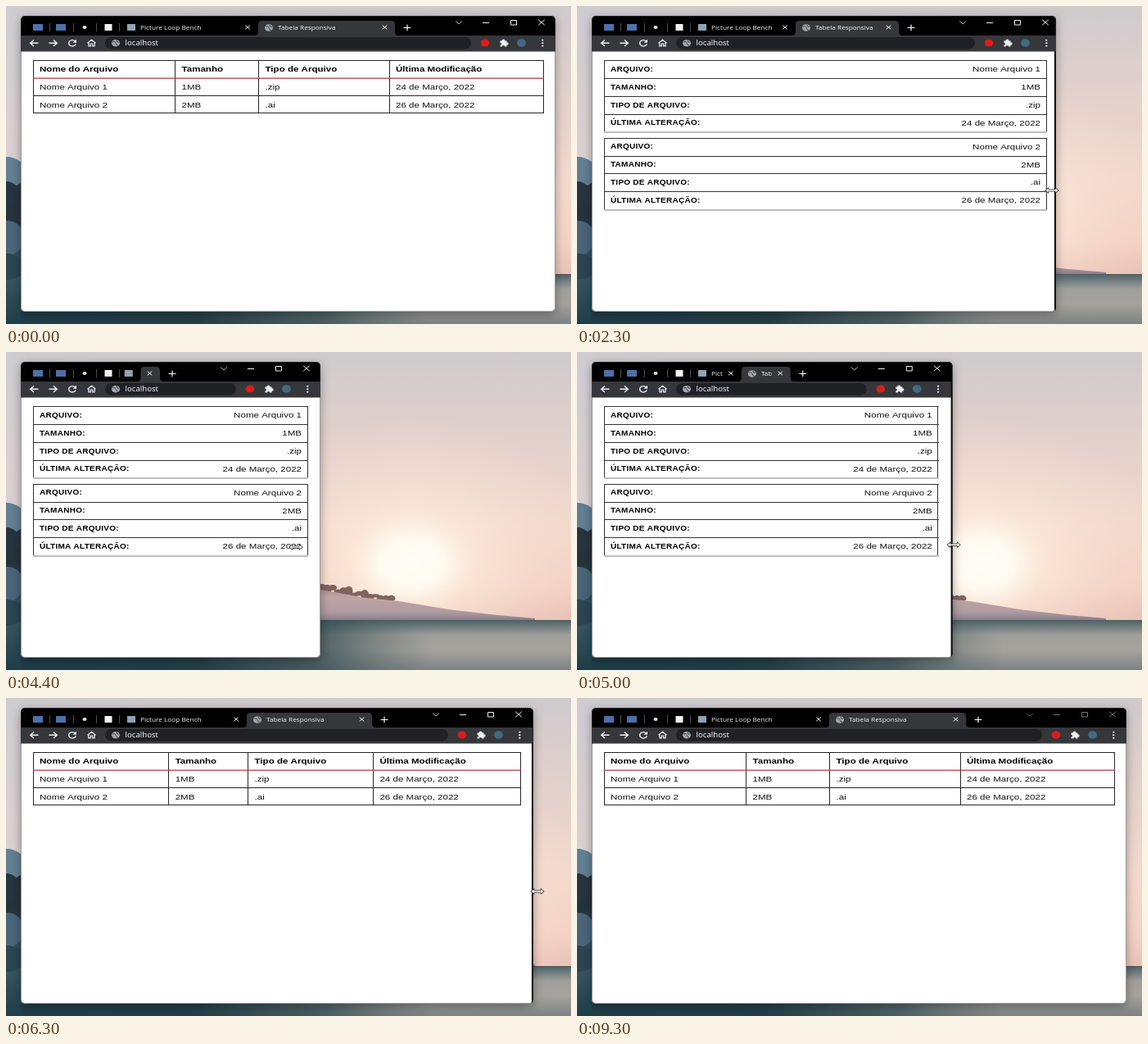
Animation of 690x388 px, one loop 9400 ms. Source, as an HTML page with a canvas:

```html
<!DOCTYPE html>
<html lang="pt">
<head>
<meta charset="utf-8">
<title>Tabela Responsiva</title>
<style>
html, body { margin: 0; width: 100%; height: 100%; overflow: hidden; background: #000; }
canvas { display: block; width: 690px; height: 388px; }
</style>
</head>
<body>
<canvas id="stage" width="690" height="388"></canvas>
<script>
const c = document.getElementById('stage').getContext('2d');
const LOOP = 9400, STEP = 100, LEFT = 18, TOP = 12, BOTTOM = 373;
const ASPECT = 1.18;
const BREAKPOINT = 612;   // below this the table turns into cards
const PAGE = '"Liberation Sans", Arial, sans-serif';
const UI = '"Open Sans", "Noto Sans", sans-serif';

// time, cursor x, cursor y, window edge, layout edge (lags behind)
const drag = [
  [1100, 674, 222, 671, 671],
  [1700, 640, 224, 643, 646],
  [2300, 580, 225, 585, 589],
  [3000, 470, 230, 475, 479],
  [3600, 380, 235, 384, 384],
  [4000, 352, 238, 384, 384],
  [4400, 354, 238, 384, 384],
  [4700, 384, 236, 384, 384],
  [5500, 587, 234, 583, 578],
  [6300, 649, 236, 644, 643],
  [7000, 672, 238, 670, 670],
  [7600, 677, 239, 675, 675],
  [8100, 673, 239, 671, 671]
];
const files = [
  ['Nome Arquivo 1', '1MB', '.zip', '24 de Março, 2022'],
  ['Nome Arquivo 2', '2MB', '.ai', '26 de Março, 2022']
];
const heads = ['Nome do Arquivo', 'Tamanho', 'Tipo de Arquivo', 'Última Modificação'];
const labels = ['ARQUIVO:', 'TAMANHO:', 'TIPO DE ARQUIVO:', 'ÚLTIMA ALTERAÇÃO:'];

function pose(t) {
  if (t <= drag[0][0]) return drag[0].slice(1);
  const i = drag.findIndex(k => k[0] > t);
  if (i < 0) return drag[drag.length - 1].slice(1);
  const a = drag[i - 1], b = drag[i], u = (t - a[0]) / (b[0] - a[0]);
  return a.slice(1).map((v, n) => v + (b[n + 1] - v) * u);
}

function rect(x, y, w, h, color) {
  c.fillStyle = color;
  c.fillRect(x, y, w, h);
}
function round(x, y, w, h, r, color) {
  c.beginPath();
  c.roundRect(x, y, w, h, r);
  c.fillStyle = color;
  c.fill();
}
function oval(x, y, rx, ry, color) {
  c.beginPath();
  c.ellipse(x, y, rx, ry, 0, 0, 7);
  c.fillStyle = color;
  c.fill();
}
function shape(d, x, y, color, width) {
  c.save();
  c.translate(x, y);
  const p = new Path2D(d);
  if (width) {
    c.strokeStyle = color;
    c.lineWidth = width;
    c.stroke(p);
  } else {
    c.fillStyle = color;
    c.fill(p);
  }
  c.restore();
}
function text(s, x, y, font, color, align = 'left', spacing = 0) {
  c.save();
  c.translate(x, y);
  c.scale(ASPECT, 1);
  c.font = font;
  c.letterSpacing = spacing + 'px';
  c.textAlign = align;
  c.fillStyle = color;
  c.fillText(s, 0, 0);
  c.restore();
}
function fade(g, stops) {
  stops.forEach(([p, color]) => g.addColorStop(p, color));
  return g;
}
function shade(x0, y0, x1, y1, stops) {
  return fade(c.createLinearGradient(x0, y0, x1, y1), stops);
}
function clipTo(x, y, w, h, r, draw) {
  c.save();
  c.beginPath();
  c.roundRect(x, y, Math.max(0, w), h, r);
  c.clip();
  draw();
  c.restore();
}

function wallpaper() {
  rect(0, 0, 690, 328, shade(0, 0, 0, 328,
    [[0, '#cfcacd'], [.3, '#e1d0cc'], [.65, '#f2d8cc'], [.88, '#f2cfc2'], [1, '#e8bfb4']]));
  rect(0, 0, 200, 328, shade(0, 0, 200, 0, [[0, 'rgba(205,205,213,.6)'], [1, 'rgba(205,205,213,0)']]));

  c.save();
  c.translate(495, 258);
  c.scale(1.25, 1);
  rect(-200, -190, 400, 260, fade(c.createRadialGradient(0, 0, 0, 0, 0, 180), [
    [0, '#fffdf6'], [.17, 'rgba(255,251,241,.97)'], [.34, 'rgba(255,240,224,.6)'],
    [.65, 'rgba(252,232,218,.3)'], [1, 'rgba(250,225,210,0)']]));
  c.restore();

  for (let i = 0; i < 14; i++) {
    oval(386 + i * 6.5, 287 + i * 1.2 + 2 * Math.sin(i * 2.3), 5, 4 + 2 * Math.sin(i * 1.7), '#80625f');
  }
  shape('M300 328V262L384 290L412 295L440 300L480 304L540 314L600 321L646 325V328Z', 0, 0,
    shade(0, 285, 0, 328, [[0, '#a58a88'], [.35, '#bda5a5'], [.75, '#b09ba0'], [1, '#857c86']]));

  rect(0, 327, 690, 61, shade(0, 327, 0, 388,
    [[0, '#4c6064'], [.1, '#66777a'], [.3, '#a09f9b'], [.6, '#a5a29c'], [1, '#7b8383']]));
  rect(0, 327, 520, 61, shade(0, 0, 520, 0,
    [[0, '#1f3d48'], [.45, 'rgba(30,58,68,.95)'], [.75, 'rgba(50,76,82,.7)'], [1, 'rgba(80,98,100,0)']]));

  rect(0, 215, 18, 173, shade(0, 215, 0, 388,
    [[0, '#26333d'], [.25, '#26333d'], [.55, '#385263'], [.7, '#355460'], [1, '#1f3e49']]));
  oval(0, 203, 24, 19, '#637f93');
  oval(0, 230, 17, 16, '#27343f');
  oval(2, 283, 20, 21, '#4a6579');
  oval(0, 318, 24, 16, '#2b4553');
}

function globe(x, y) {
  oval(x, y, 5, 4.3, '#a4a8ac');
  shape('M-4 -1Q-1 -3 0 0T3 3M1 -4Q1 -1 4 -1', x, y, '#55585c', 1.1);
}
function cross(x, y, r, color, width = 1) {
  shape(`M${-r} ${-r * .85}L${r} ${r * .85}M${r} ${-r * .85}L${-r} ${r * .85}`, x, y, color, width);
}

function tabs(edge, active) {
  const end = edge - 196, w = (end - 141) / 2, start = 141 + w, wide = w > 45;
  const light = '#f4f4f5', font = '500 7px ' + UI;
  rect(33, 22, 12, 8, '#4c70ad');
  rect(61, 22, 12, 8, '#4c70ad');
  oval(96, 26, 2.5, 2.1, '#e4e4e4');
  rect(120.5, 22, 9, 8, '#f2f2f2');
  [53, 82, 110, 138].forEach(x => rect(x, 21, 1, 10, '#4b4d51'));
  rect(Math.min(153, 138 + w / 2) - 5, 22, 10, 8, '#8fa3b5');

  shape(`M${start - 5} 36Q${start} 36 ${start} 32V22Q${start} 18 ${start + 5} 18H${end - 5}` +
    `Q${end} 18 ${end} 22V32Q${end} 36 ${end + 5} 36Z`, 0, 0, '#36373b');
  if (wide) {
    clipTo(160, 18, start - 23 - 160, 18, 0, () => text('Picture Loop Bench', 164, 28.5, font, light));
    cross(start - 13, 26, 2.8, light);
    globe(start + 13, 26.5);
    clipTo(start + 20, 18, w - 43, 18, 0, () => text('Tabela Responsiva', start + 24, 28.5, font, light));
  }
  cross(end - 12.5, 26, 2.8, light);
  shape('M-4.5 0H4.5M0 -3.8V3.8', edge - 181, 26.5, '#fff', 1.2);

  const ink = active ? '#f2f2f2' : '#77787a';
  shape('M-4 -1.5L0 2L4 -1.5', edge - 118, 20, active ? '#b5b5b5' : '#5c5d5f', 1);
  shape('M-4 0.5H4', edge - 85, 20, ink, 1);
  shape('M-3.5 -2.5H3.5V3H-3.5Z', edge - 51, 20, ink, 1);
  cross(edge - 17, 20, 3.8, ink);
}

function toolbar(edge) {
  const ink = '#f0f1f2';
  rect(LEFT, 36, edge - LEFT, 19.5, '#36373b');
  shape('M5 0H-4.5M-.5 -3.8L-4.8 0L-.5 3.8', 34.5, 45.2, ink, 1.4);
  shape('M-5 0H4.5M.5 -3.8L4.8 0L.5 3.8', 57.5, 45.2, ink, 1.4);
  shape('M3.5 -2.2A4.4 3.7 0 1 0 4.3 1', 81, 45.2, ink, 1.4);
  shape('M5 -4.5V-.5H.5Z', 81, 45.2, ink);
  shape('M-5 0L0 -4L5 0M-3.6 -.8V3.7H-1.2V.8H1.2V3.7H3.6V-.8', 104.5, 45.2, ink, 1.2);

  round(121, 38, edge - 224, 14.5, 7.2, '#202124');
  globe(134, 45.2);
  text('localhost', 145.5, 48, '500 8.2px ' + UI, '#fff');

  oval(edge - 86, 45, 5.3, 4.6, '#dc1c1c');
  const x = edge - 63;
  rect(x - 4.5, 42.5, 8, 7, ink);
  oval(x - .5, 42.2, 1.9, 1.8, ink);
  oval(x + 3.8, 46, 1.9, 1.8, ink);
  oval(x - 4.4, 46.2, 1.4, 1.3, '#36373b');
  oval(x - .5, 49.3, 1.4, 1.2, '#36373b');
  oval(edge - 41.5, 45, 5.4, 4.8, '#416a84');
  [41.8, 45.3, 48.8].forEach(y => oval(edge - 15.7, y, 1.2, 1, ink));
}

function table(edge) {
  const right = edge - 15, d = edge - 671, line = '#262626';
  const cols = [33, 206.5 + .28 * d, 308.5 + .464 * d, 468 + .7 * d];
  [...cols, right].forEach(x => rect(Math.floor(x), 66, 1, 65, line));
  [66, 109, 130].forEach(y => rect(33, y, right - 32, 1, line));
  rect(33, 87.5, right - 32, 1.3, '#b5434a');
  cols.forEach((x, i) => {
    text(heads[i], x + 8, 80.2, 'bold 9.8px ' + PAGE, '#000');
    files.forEach((f, n) => text(f[i], x + 8, 102.2 + n * 21.4, '9.8px ' + PAGE, '#111'));
  });
}

function cards(edge) {
  const right = edge - 15, line = '#333';
  files.forEach((file, n) => {
    const top = 66.4 + n * 94.4;
    [33, right - 1].forEach(x => rect(Math.floor(x), Math.round(top), 1, 87, line));
    file.forEach((value, i) => {
      const y = top + i * 21.75;
      rect(33, Math.round(y), right - 33, 1, line);
      text(labels[i], 41, y + 13.6, 'bold 8.5px ' + PAGE, '#000', 'left', .2);
      text(value, right - 8, y + 14, '9.8px ' + PAGE, '#111', 'right');
    });
    rect(33, Math.round(top + 86.7), right - 33, 2, '#bdbdbd');
  });
}

function cursor(x, y, busy) {
  if (busy) {
    oval(x, y, 5.5, 4.5, '#d8ecfb');
    c.strokeStyle = '#2f92dc';
    c.lineWidth = 2.8;
    c.stroke();
    return;
  }
  const d = 'M-7.5 0L-4.5 -2.5V-.7H4.5V-2.5L7.5 0L4.5 2.5V.7H-4.5V2.5Z';
  shape(d, x, y, '#222', 1.4);
  shape(d, x, y, '#fff');
}

function draw(t) {
  const [cx, cy, win, edge] = pose(t);
  const width = win - LEFT, height = BOTTOM - TOP;
  wallpaper();
  c.save();
  c.shadowColor = 'rgba(0,0,0,.35)';
  c.shadowBlur = 12;
  c.shadowOffsetY = 3;
  round(LEFT, TOP, width, height, 5, '#000');
  c.restore();

  clipTo(LEFT, TOP, width, height, 5, () => {
    tabs(edge, t < 9200);
    toolbar(edge);
    const pageEnd = Math.abs(win - edge) < .5 ? win : Math.min(edge, win - 2);
    clipTo(LEFT, 55.5, pageEnd - LEFT, BOTTOM - 55.5, 0, () => {
      rect(LEFT, 55, width, 320, '#fff');
      (edge < BREAKPOINT ? cards : table)(edge);
    });
  });
  c.strokeStyle = 'rgba(60,60,60,.5)';
  c.lineWidth = 1;
  c.beginPath();
  c.roundRect(LEFT + .5, TOP + .5, width - 1, height - 1, 5);
  c.stroke();

  if (t >= 700 && t < 8200) cursor(cx, cy, t >= 5400 && t < 5700);
}

const begin = performance.now();
function tick() {
  const t = Math.max(0, performance.now() - begin) % LOOP;
  draw(Math.floor(t / STEP) * STEP);
  requestAnimationFrame(tick);
}
tick();
</script>
</body>
</html>
```
